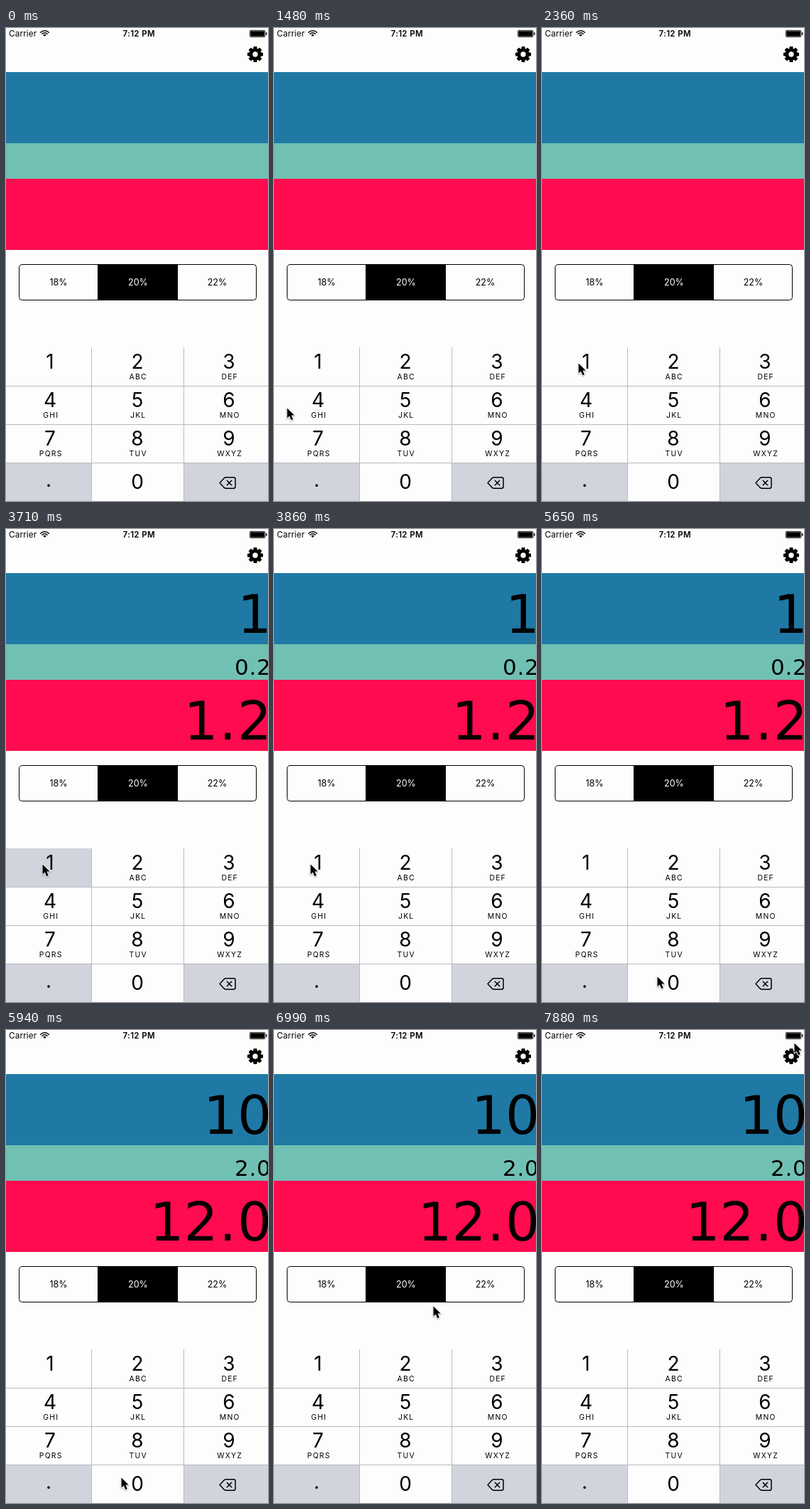
Write an HTML page with a canvas that moves like this. It is 369 px wide and 665 px high and loops after 8000 ms.

```html
<!DOCTYPE html>
<html lang="en">
<head>
<meta charset="utf-8">
<title>Tip calculator</title>
<style>
  html, body { margin: 0; width: 100%; height: 100%; overflow: hidden; background: #fdfdfd; }
  canvas { display: block; width: 100%; height: 100%; }
</style>
</head>
<body>
<canvas id="stage"></canvas>
<script>
const W = 369, H = 665, LOOP = 8000;
const UI = 'Inter, Roboto, sans-serif';
const WIDE = '"DejaVu Sans", Verdana, sans-serif';
const GREY = '#d1d4dc', PAPER = '#fdfdfd';

const canvas = document.getElementById('stage');
const ratio = window.devicePixelRatio || 1;
canvas.width = W * ratio;
canvas.height = H * ratio;
const ctx = canvas.getContext('2d');
ctx.scale(ratio, ratio);

// Pointer moves in discrete steps and rests until the next move.
const MOVES = [
  { start: 900, end: 1920, steps: 8, from: [3, 565], to: [37, 496], power: 1.45 },
  { start: 2060, end: 2360, steps: 3, from: [42, 487], to: [51, 471], power: 0.8 },
  { start: 5060, end: 5650, steps: 5, from: [91, 503], to: [162, 629], power: 0.8 },
  { start: 6840, end: 7140, steps: 3, from: [186, 535], to: [271, 208], power: 1.15 },
  { start: 7580, end: 7880, steps: 3, from: [363, 4], to: [355, 18], power: 1 }
];

const KEYS = [
  ['1', ''], ['2', 'ABC'], ['3', 'DEF'],
  ['4', 'GHI'], ['5', 'JKL'], ['6', 'MNO'],
  ['7', 'PQRS'], ['8', 'TUV'], ['9', 'WXYZ']
];
const COLS = [62, 185, 314];

function box(x, y, w, h, color) {
  ctx.fillStyle = color;
  ctx.fillRect(x, y, w, h);
}

function text(str, x, y, font, align = 'center', color = '#000', spacing = 0) {
  ctx.font = font;
  ctx.textAlign = align;
  ctx.fillStyle = color;
  ctx.letterSpacing = spacing + 'px';
  ctx.fillText(str, x, y);
  ctx.letterSpacing = '0px';
}

function poly(points) {
  ctx.beginPath();
  points.forEach(([x, y]) => ctx.lineTo(x, y));
  ctx.closePath();
}

// Right-aligned amount with a roomy decimal point.
function amount(str, right, y, size) {
  const gap = size * 0.046;
  let x = right;
  for (const ch of [...str].reverse()) {
    const dot = ch === '.' ? gap / 2 : 0;
    x -= dot;
    text(ch, x, y, `${size}px ${WIDE}`, 'right');
    x -= ctx.measureText(ch).width + dot;
  }
}

function wifi(x, y) {
  ctx.strokeStyle = '#000';
  ctx.lineWidth = 1.5;
  for (const r of [8.2, 5.2]) {
    ctx.beginPath();
    ctx.arc(x, y, r, -Math.PI * 0.75, -Math.PI * 0.25);
    ctx.stroke();
  }
  ctx.fillStyle = '#000';
  ctx.beginPath();
  ctx.moveTo(x, y);
  ctx.arc(x, y, 3, -Math.PI * 0.75, -Math.PI * 0.25);
  ctx.fill();
}

function battery() {
  ctx.strokeStyle = '#000';
  ctx.lineWidth = 0.8;
  ctx.beginPath();
  ctx.roundRect(343.4, 3.4, 21.6, 9.2, 1.5);
  ctx.stroke();
  box(344.3, 4.3, 19.8, 7.4, '#000');
  box(366, 6.2, 1.4, 3.6, '#000');
}

function gear(x, y) {
  ctx.save();
  ctx.translate(x, y);
  ctx.fillStyle = '#000';
  ctx.beginPath();
  ctx.arc(0, 0, 8.6, 0, Math.PI * 2);
  ctx.arc(0, 0, 3.7, 0, Math.PI * 2, true);
  ctx.fill();
  for (let i = 0; i < 8; i++) {
    ctx.beginPath();
    ctx.roundRect(-2.5, -11, 5, 4.5, 0.8);
    ctx.fill();
    ctx.rotate(Math.PI / 4);
  }
  ctx.restore();
}

function statusBar() {
  text('Carrier', 4, 12, `11.7px ${UI}`, 'left', '#000', 0.15);
  wifi(54.5, 12);
  text('7:12 PM', 187.2, 12, `600 11.5px ${UI}`, 'center', '#000', 0.35);
  battery();
  gear(351, 37);
}

function bands(t) {
  box(0, 62, W, 100, '#1f79a4');
  box(0, 162, W, 50, '#70c1b3');
  box(0, 212, W, 100, '#ff0b4f');
  if (t < 3710) return;
  const [bill, tip, total] = t < 5940 ? ['1', '0.2', '1.2'] : ['10', '2.0', '12.0'];
  amount(bill, 374, 146, 75.5);
  amount(tip, 372.7, 205, 31);
  amount(total, 374, 296, 75.5);
}

function rates() {
  const font = `12.5px ${UI}`;
  ctx.strokeStyle = '#000';
  ctx.lineWidth = 1;
  ctx.beginPath();
  ctx.roundRect(18.5, 332.5, 334, 50, 4);
  ctx.stroke();
  box(129, 332, 113, 51, '#000');
  text('18%', 74, 362, font);
  text('20%', 186, 362, font, 'center', '#fff');
  text('22%', 297.5, 362, font);
}

function backspace() {
  ctx.strokeStyle = '#000';
  ctx.lineWidth = 1.5;
  ctx.lineJoin = ctx.lineCap = 'round';
  ctx.beginPath();
  ctx.moveTo(301, 639.5);
  ctx.lineTo(307.5, 632.6);
  ctx.quadraticCurveTo(308.5, 631.7, 310, 631.7);
  ctx.lineTo(320.5, 631.7);
  ctx.quadraticCurveTo(323, 631.7, 323, 634.2);
  ctx.lineTo(323, 644.8);
  ctx.quadraticCurveTo(323, 647.3, 320.5, 647.3);
  ctx.lineTo(310, 647.3);
  ctx.quadraticCurveTo(308.5, 647.3, 307.5, 646.4);
  ctx.closePath();
  ctx.moveTo(311.3, 636.3);
  ctx.lineTo(317.7, 642.7);
  ctx.moveTo(317.7, 636.3);
  ctx.lineTo(311.3, 642.7);
  ctx.stroke();
}

function keypad(pressed) {
  const digit = `28px ${UI}`;
  if (pressed) box(0, 449, 120, 54, GREY);
  box(0, 611, 120, 54, GREY);
  box(251, 611, 118, 54, GREY);
  for (const y of [503, 557, 611]) box(0, y, W, 1, '#b9babd');
  for (const x of [120, 250]) box(x, 449, 1, 216, '#b9babd');
  KEYS.forEach(([num, letters], i) => {
    const x = COLS[i % 3], y = 479 + Math.floor(i / 3) * 54;
    text(num, x, y, digit);
    text(letters, x + 1.2, y + 15, `10.4px ${UI}`, 'center', '#000', 1.2);
  });
  text('.', 60, 645, digit);
  text('0', 185, 648, digit);
  backspace();
}

function pointerAt(t) {
  if (t >= 7290 && t < 7580) return null;
  const move = MOVES.filter(m => t >= m.start).pop();
  if (!move) return null;
  const { start, end, steps, from, to, power } = move;
  const last = steps - 1;
  const step = Math.min(last, Math.floor((t - start) / (end - start) * last + 0.05));
  const u = Math.pow(step / last, power);
  return from.map((v, i) => Math.round(v + (to[i] - v) * u));
}

function pointer([x, y]) {
  ctx.save();
  ctx.translate(x, y);
  poly([[0.5, 0.5], [0.5, 14.5], [3.7, 11.6], [6.2, 17.2], [8.8, 16], [6.4, 10.6], [10.7, 10.4]]);
  ctx.shadowColor = 'rgba(0,0,0,0.35)';
  ctx.shadowBlur = 2 * ratio;
  ctx.shadowOffsetY = ratio;
  ctx.lineJoin = 'round';
  ctx.lineWidth = 1.8;
  ctx.strokeStyle = '#fff';
  ctx.stroke();
  ctx.shadowColor = 'transparent';
  ctx.fillStyle = '#000';
  ctx.fill();
  ctx.restore();
}

function draw(t) {
  box(0, 0, W, H, PAPER);
  statusBar();
  bands(t);
  rates();
  keypad(t >= 3710 && t < 3860);
  const spot = pointerAt(t);
  if (spot) pointer(spot);
}

const began = performance.now();
function tick() {
  draw((performance.now() - began) % LOOP);
  requestAnimationFrame(tick);
}
tick();
</script>
</body>
</html>
```
